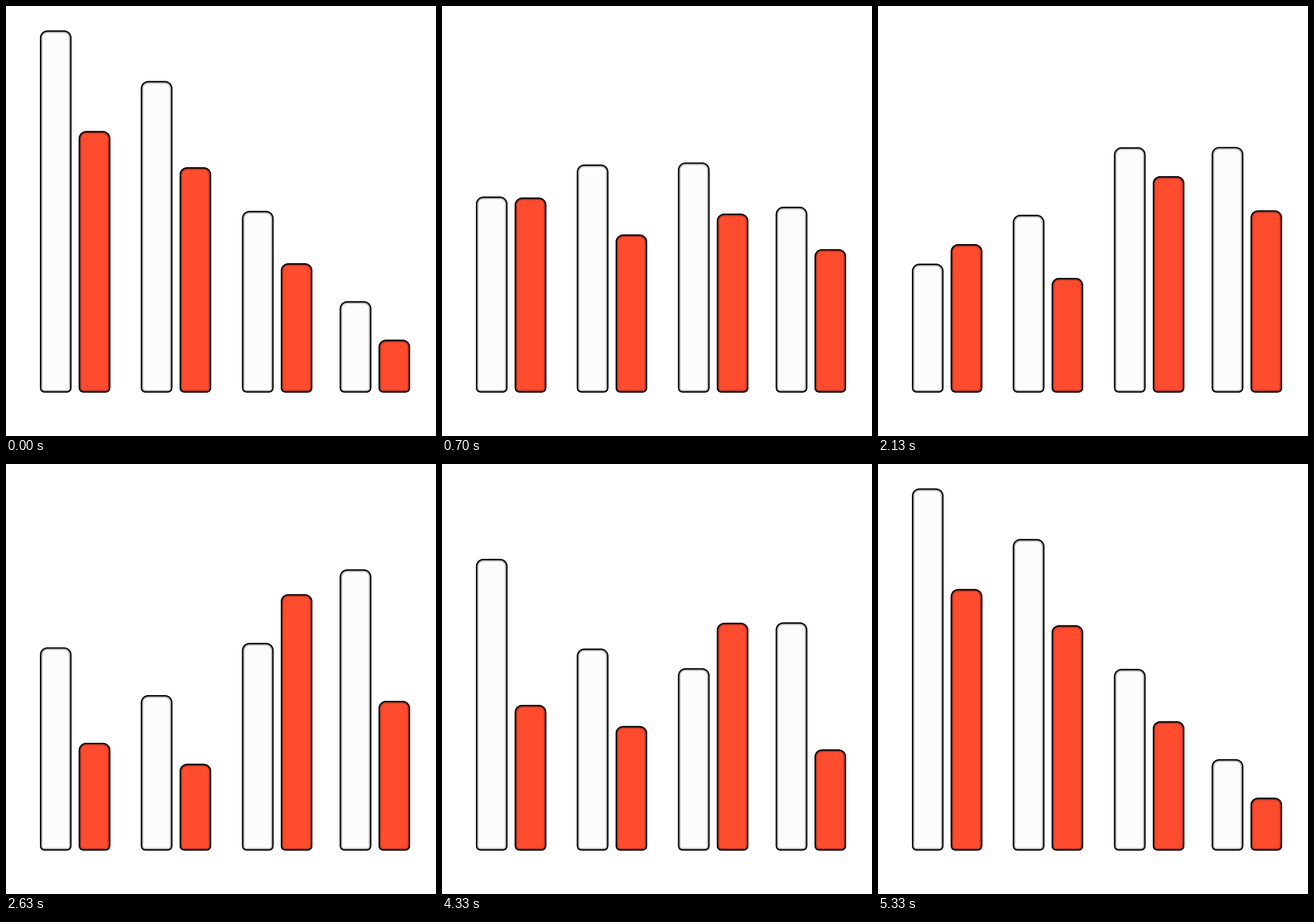
Animation of 748 by 748 pixels, one loop 6.01 s. Source, as an HTML page with a canvas:

```html
<!DOCTYPE html>
<html lang="en">
<head>
<meta charset="utf-8">
<title>Bar chart</title>
<style>
  html, body { margin: 0; width: 100%; height: 100%; overflow: hidden; background: #fff; }
  canvas { display: block; }
</style>
</head>
<body>
<canvas id="chart" width="748" height="748"></canvas>
<script>
const LOOP = 6010, REST = 2000, MOVE = 1000, LAG = 76;
const BASE = 672.5, WIDTH = 55, PAIR_GAP = 67.5;
const WHITE = '#fcfcfc', RED = '#ff4b2e';

// Each pair of bars: left edge, then the heights it visits in turn.
const pairs = [
  { x: 59, white: [630, 188, 439], red: [455, 278, 141] },
  { x: 234.5, white: [542, 320, 245], red: [392, 213, 119] },
  { x: 410.5, white: [316, 445, 318], red: [225, 357, 492] },
  { x: 580.5, white: [159, 410, 530], red: [92, 333, 223] }
];

const ctx = document.getElementById('chart').getContext('2d');

// Almost linear, slightly slower towards the end.
const ease = u => u + .128 * u * (1 - u);

// The picture advances in an uneven 30 / 70 ms rhythm.
const step = t => Math.floor(t / 100) * 100 + (t % 100 >= 30 ? 30 : 0);

function drawBar(x, height, color) {
  ctx.save();
  ctx.beginPath();
  ctx.roundRect(x, BASE - height, WIDTH, height, [13, 13, 8, 8]);
  ctx.clip();
  ctx.fillStyle = color;
  ctx.fill();
  // Clipped strokes: a soft inner shade that ends in a solid outline.
  for (let width = 10; width > 5; width--) {
    ctx.lineWidth = width;
    ctx.strokeStyle = 'rgba(0, 0, 0, .09)';
    ctx.stroke();
  }
  ctx.lineWidth = 4.4;
  ctx.strokeStyle = '#000';
  ctx.stroke();
  ctx.restore();
}

function draw(time) {
  const t = step(time % LOOP);
  const phase = Math.min(2, Math.floor(t / REST));
  const start = phase ? phase * REST : LAG;
  const p = ease(Math.min(1, Math.max(0, (t - start) / MOVE)));
  const blend = h => h[phase] + (h[(phase + 1) % 3] - h[phase]) * p;

  ctx.clearRect(0, 0, 748, 748);
  for (const { x, white, red } of pairs) {
    drawBar(x, blend(white), WHITE);
    drawBar(x + PAIR_GAP, blend(red), RED);
  }
}

const began = performance.now();
function tick() {
  draw(performance.now() - began);
  requestAnimationFrame(tick);
}
tick();
</script>
</body>
</html>
```
